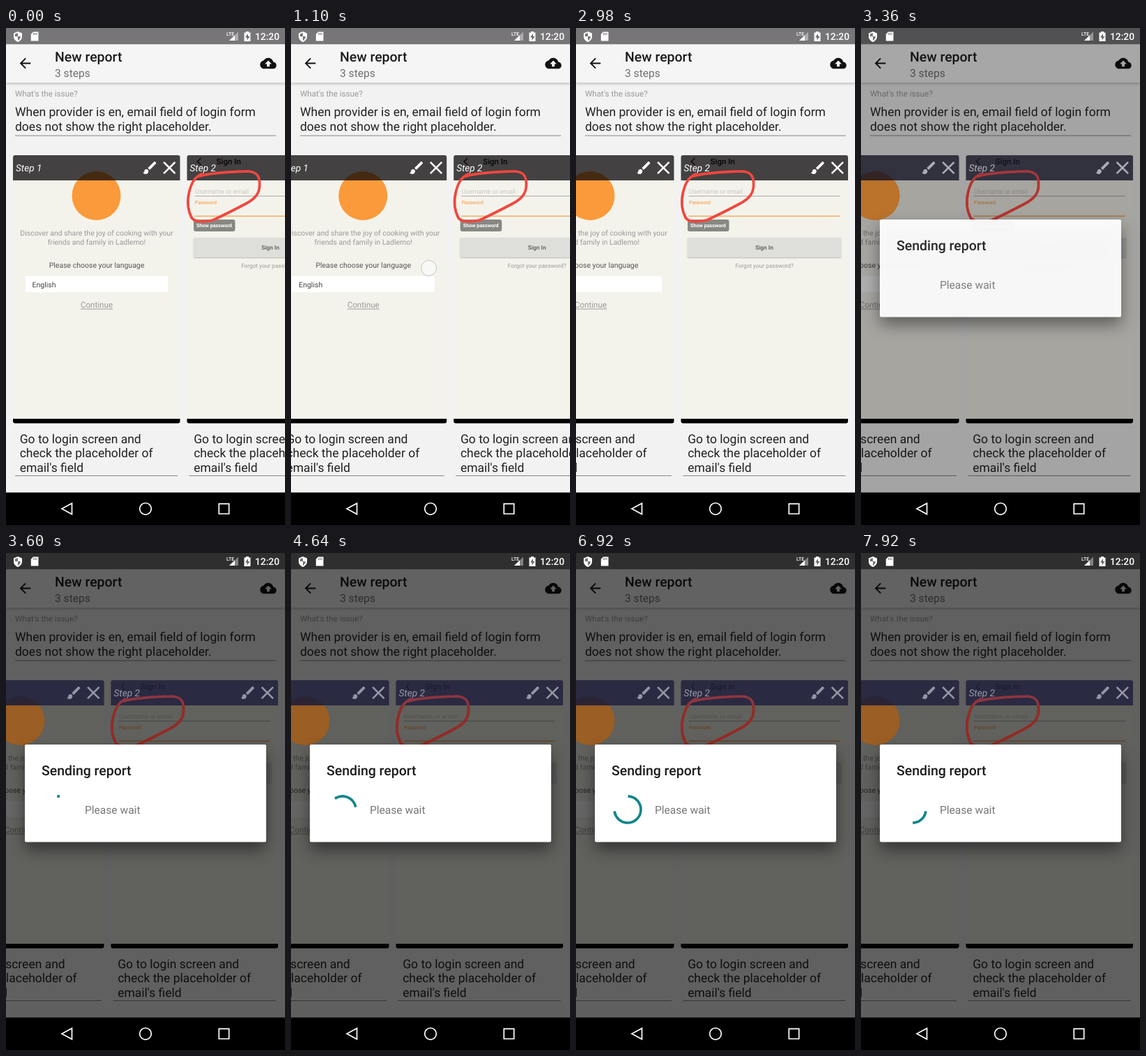
Recreate the animation shown at these times as an HTML page with a canvas. Size 400 by 711 pixels, loop 8000 ms.

```html
<!DOCTYPE html>
<html lang="en">
<head>
<meta charset="utf-8">
<title>New report</title>
<style>
  html, body { margin: 0; width: 100%; height: 100%; overflow: hidden; background: #000; }
  canvas { display: block; }
</style>
</head>
<body>
<canvas width="400" height="711"></canvas>
<script>
const ctx = document.querySelector('canvas').getContext('2d');
ctx.textRendering = 'geometricPrecision';
const LOOP = 8000, PITCH = 249.5;

const scrollKeys = [[700, 0], [900, -4], [1000, -13], [1100, -26], [1180, -50], [1260, -78], [1460, -105], [1700, -109]];
const dimKeys = [[3359, 0], [3360, 0.32], [3480, 0.6]];
const dialogKeys = [[3359, 0], [3360, 0.95], [3480, 1]];
const spinnerKeys = [[3580, 0], [5920, 2060], [7920, 4172], [8000, 4256]];

// Icons on a 24 by 24 grid
const icons = {
  back: 'M20 11H7.800l5.600-5.600L12 4l-8 8 8 8 1.400-1.400L7.800 13H20z',
  cloud: 'M19.350 10C18.700 6.600 15.600 4 12 4 9.100 4 6.600 5.600 5.350 8 2.300 8.400 0 10.900 0 14c0 3.300 2.700 6 6 6h13' +
    'c2.800 0 5-2.200 5-5 0-2.600-2-4.800-4.650-5zM14 13v4h-4v-4H7l5-5 5 5z',
  brush: 'M7 14c-1.700 0-3 1.300-3 3 0 1.300-1.200 2-2 2 .9 1.200 2.500 2 4 2 2.200 0 4-1.800 4-4 0-1.700-1.300-3-3-3z' +
    'm13.700-9.400l-1.300-1.300c-.4-.4-1-.4-1.400 0L9 12.250 11.750 15l8.950-9c.4-.4.4-1 0-1.400z',
  close: 'M19 6.400L17.600 5 12 10.600 6.400 5 5 6.400 10.600 12 5 17.600 6.400 19 12 13.400 17.600 19 19 17.600 13.400 12z'
};

// Piecewise linear value of [time, value] keys
function at(keys, t) {
  if (t <= keys[0][0]) return keys[0][1];
  for (let i = 1; i < keys.length; i++) {
    const [t0, a] = keys[i - 1], [t1, b] = keys[i];
    if (t <= t1) return a + (b - a) * (t - t0) / (t1 - t0);
  }
  return keys[keys.length - 1][1];
}

function text(str, x, y, size, color, style = '', align = 'left') {
  ctx.font = `${style} ${size}px Roboto, sans-serif`;
  ctx.fillStyle = color;
  ctx.textAlign = align;
  ctx.fillText(str, x, y);
}

function rect(x, y, w, h, color, radius = 0) {
  ctx.fillStyle = color;
  ctx.beginPath();
  ctx.roundRect(x, y, w, h, radius);
  ctx.fill();
}

function disc(x, y, r, color) {
  ctx.fillStyle = color;
  ctx.beginPath();
  ctx.arc(x, y, r, 0, 7);
  ctx.fill();
}

function fillPath(d, color) {
  ctx.fillStyle = color;
  ctx.fill(new Path2D(d));
}

function strokePath(d, color, width) {
  ctx.strokeStyle = color;
  ctx.lineWidth = width;
  ctx.stroke(new Path2D(d));
}

function shadow(color, blur, dy) {
  ctx.shadowColor = color;
  ctx.shadowBlur = blur;
  ctx.shadowOffsetY = dy;
}

function shifted(x, y, draw) {
  ctx.save();
  ctx.translate(x, y);
  draw();
  ctx.restore();
}

function icon(name, x, y, scale, color) {
  shifted(x, y, () => {
    ctx.scale(scale, scale);
    ctx.translate(-12, -12);
    fillPath(icons[name], color);
  });
}

function languageScreen() {
  disc(119.5, 240, 35, '#fb9a3a');
  text('Discover and share the joy of cooking with your', 120, 297, 10.5, '#999', '', 'center');
  text('friends and family in Ladlemo!', 120, 310, 10.5, '#999', '', 'center');
  text('Please choose your language', 120, 342.5, 10.5, '#555', '', 'center');
  rect(18, 355, 204, 23, '#fff');
  text('English', 27.5, 370.5, 10.5, '#444');
  text('Continue', 120, 400, 11.6, '#999', '', 'center');
  rect(97, 401.5, 46, 1, '#999');
}

function signInScreen() {
  strokePath('M20 186l-5 5 5 5', '#222', 1.5);
  text('Sign In', 42, 195, 11.5, '#111', '500');
  text('Username or email', 11.5, 237, 9.2, '#c8c8c4');
  rect(11, 240, 217, 1, '#aaa');
  text('Password', 11.5, 252, 7, '#f5923a');
  rect(11, 268.5, 217, 1.2, '#f0a050');
  rect(9.5, 274, 59.5, 17, '#888883', 3);
  text('Show password', 39, 285, 7.2, '#fff', 'bold', 'center');
  shadow('rgba(0,0,0,.25)', 2, 1);
  rect(9.5, 300, 220, 28, '#dededa', 1);
  shadow('transparent', 0, 0);
  text('Sign In', 119.5, 317, 8.4, '#555', '500', 'center');
  text('Forgot your password?', 119.5, 343, 8.25, '#999', '', 'center');
}

function cardBody(screen) {
  rect(0, 182, 239.5, 383, '#f4f3eb', 3);
  screen();
  rect(0, 182, 239.5, 36, 'rgba(2,0,4,.73)', [3, 3, 0, 0]);
  rect(0, 559, 239.5, 6.5, '#000', [0, 0, 3, 3]);
  ['Go to login screen and', 'check the placeholder of', "email's field"]
    .forEach((line, i) => text(line, 9.7, 593.5 + 20.5 * i, 17.5, '#222'));
  rect(3, 640, 233, 1, '#888');
}

function cardHeader(title) {
  text(title, 4, 205, 13.6, '#fff', 'italic');
  icon('brush', 196.3, 200, 1, '#fff');
  icon('close', 224.3, 200, 1.3, '#fff');
}

function scribble() {
  ctx.lineCap = ctx.lineJoin = 'round';
  strokePath('M18 212C38 206 66 206 86 205C98 205 104 210 104 222C105 236 98 244 85 251' +
    'C68 260 52 268 37 275C26 277 13 279 7 272C1 261 0 248 3 235C6 223 10 214 21 209', '#f2473f', 3.7);
  ctx.lineCap = 'butt';
  ctx.lineJoin = 'miter';
}

const cards = [['Step 1', languageScreen], ['Step 2', signInScreen], ['Step 3', signInScreen]];

function eachCard(scroll, draw) {
  cards.forEach(([title, screen], i) =>
    shifted(10 + PITCH * i + scroll, 0, () => draw(title, screen, i)));
}

function highlights(scroll) {
  eachCard(scroll, (title, screen, i) => {
    cardHeader(title);
    if (i === 1) scribble();
  });
}

function page(scroll) {
  rect(0, 0, 400, 711, '#f2f2f2');
  shadow('rgba(0,0,0,.4)', 5, 1);
  rect(0, 23, 400, 55.3, '#f5f5f5');
  shadow('transparent', 0, 0);
  rect(0, 0, 400, 23.3, '#777578');
  icon('back', 27.5, 50.5, 0.973, '#111');
  text('New report', 70, 48, 19.46, '#1c1c1c', '500');
  text('3 steps', 70, 70, 15.57, '#707070');
  icon('cloud', 376, 50.5, 0.973, '#111');

  text("What's the issue?", 13, 98, 11.67, '#999');
  text('When provider is en, email field of login form', 13, 126, 17.5, '#222');
  text('does not show the right placeholder.', 13, 146.5, 17.5, '#222');
  rect(13, 153.5, 374, 1, '#888');
  eachCard(scroll, (title, screen) => cardBody(screen));
  highlights(scroll);
}

function dimPage(scroll, dim) {
  rect(0, 0, 400, 711, `rgba(0,0,0,${dim})`);
  ctx.globalAlpha = 0.6 * dim;
  eachCard(scroll, (title, screen, i) => {
    rect(0, 182, 239.5, 36, '#464687', [3, 3, 0, 0]);
    if (i === 0) {
      ctx.save();
      ctx.beginPath();
      ctx.rect(0, 218, 240, 80);
      ctx.clip();
      disc(119.5, 240, 35, '#fb9a3a');
      ctx.restore();
    }
  });
  highlights(scroll);
  ctx.globalAlpha = 1;
}

function systemBars() {
  fillPath('M17 5l6 2.500v4.500c0 4-2.500 6.500-6 8-3.500-1.500-6-4-6-8v-4.500z', '#fff');
  fillPath('M17 7v5h4c-.3 3-2 4.800-4 6v-6h-4V8.600z', '#777');
  fillPath('M39 5.500h7.500v13h-10.700v-9.700z', '#fff');
  [39, 41.2, 43.4].forEach(x => rect(x, 7, 1.2, 3, '#888'));
  text('LTE', 316, 11, 7, '#fff', '500');
  fillPath('M333 5.500V18h-13z', 'rgba(255,255,255,.4)');
  fillPath('M328 10.500V18h-8z', '#fff');
  fillPath('M341.500 6.500h2.500V5h4v1.500h2.500V19h-9z', '#fff');
  fillPath('M347 8l-4 5.500h2.500v4l4-5.500h-2.500z', '#666');
  text('12:20', 357, 17, 13.8, '#fff', '500');

  rect(0, 664.5, 400, 47, '#000');
  strokePath('M94.500 680v15.600l-14.500-7.800z', '#fff', 1.7);
  strokePath('M208.300 687.800a8.300 8.300 0 1 0-16.600 0a8.300 8.300 0 1 0 16.600 0z', '#fff', 1.7);
  strokePath('M305.300 680.600h14.400v14.400h-14.400z', '#fff', 1.7);
}

// Trim easing: cubic curve through (0,0) (.2,0) (.1,1) (.5,1)
function trim(x) {
  if (x <= 0) return 0;
  if (x >= 0.5) return 1;
  let lo = 0, hi = 1;
  for (let i = 0; i < 20; i++) {
    const s = (lo + hi) / 2, r = 1 - s;
    if (0.6 * s * r * r + 0.3 * s * s * r + 0.5 * s ** 3 < x) lo = s; else hi = s;
  }
  return lo * lo * (3 - 2 * lo);
}

function spinner(elapsed) {
  const phase = elapsed / 1333 % 1;
  const base = 90 * phase + 720 * elapsed / 6665 - 90;
  const start = base + 270 * trim(phase - 0.5);
  const end = Math.max(base + 270 * trim(phase), start + 0.5);
  ctx.strokeStyle = '#12858b';
  ctx.lineWidth = 3.7;
  ctx.lineCap = 'square';
  ctx.beginPath();
  ctx.arc(74, 367, 19, start * Math.PI / 180, end * Math.PI / 180);
  ctx.stroke();
  ctx.lineCap = 'butt';
}

function dialog(alpha, t) {
  ctx.globalAlpha = alpha;
  shadow('rgba(0,0,0,.45)', 22, 11);
  rect(27, 274, 346, 139.5, '#fff', 2);
  shadow('transparent', 0, 0);
  text('Sending report', 51, 318, 19.46, '#1c1c1c', '500');
  text('Please wait', 113, 372.5, 15.57, '#777');
  ctx.globalAlpha = 1;
  if (t >= 3580) spinner(at(spinnerKeys, t));
}

function touch(scroll) {
  disc(224 + scroll, 343.5, 11, 'rgba(250,250,250,.75)');
  ctx.strokeStyle = '#c4c4c4';
  ctx.lineWidth = 1;
  ctx.stroke();
}

function frame(now) {
  const t = now % LOOP;
  const scroll = at(scrollKeys, t);
  const dim = at(dimKeys, t);
  page(scroll);
  if (t >= 700 && t < 1300) touch(scroll);
  if (dim > 0) {
    dimPage(scroll, dim);
    dialog(at(dialogKeys, t), t);
  }
  systemBars();
  requestAnimationFrame(frame);
}
requestAnimationFrame(frame);
</script>
</body>
</html>
```
